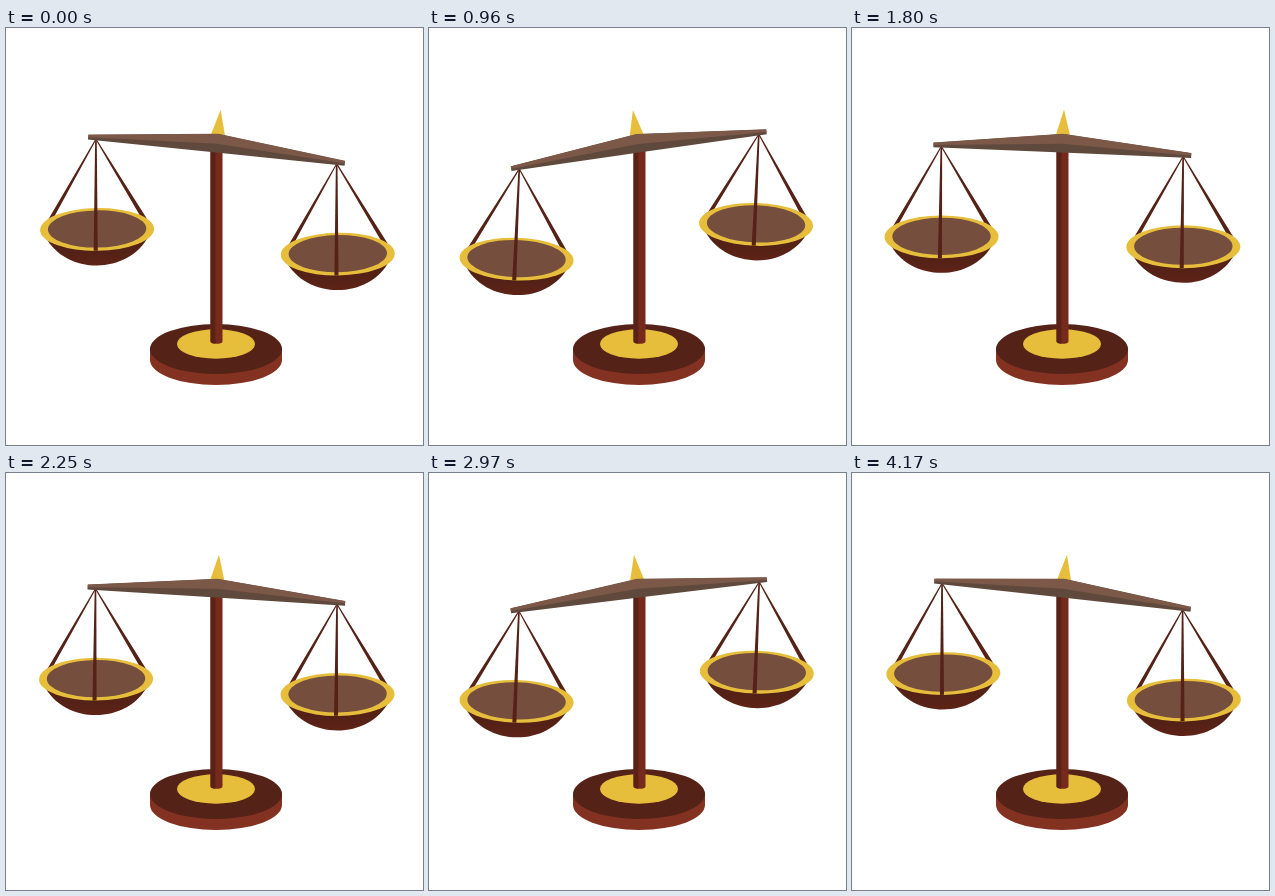
Recreate the animation shown at these times as an HTML page. Size 417 by 417 pixels, loop 4.2 s.

```html
<!DOCTYPE html>
<html lang="en">
<head>
<meta charset="utf-8">
<title>Balance scale</title>
<style>
  html, body { margin: 0; width: 100%; height: 100%; overflow: hidden; background: #fff; }
  svg { display: block; width: 100vw; height: 100vh; }
</style>
</head>
<body>
<svg viewBox="0 0 417 417">
  <defs>
    <linearGradient id="bowl" x1="0" y1="0" x2="0" y2="1">
      <stop offset=".5" stop-color="#532116"/>
      <stop offset="1" stop-color="#5e2317"/>
    </linearGradient>
    <!-- Pan with its strings; the hanging point is the origin -->
    <g id="pan">
      <path fill="#552217" d="M-.8 0 L-49 80 H-44.5 L.4 0Z M-.4 0 L45 80 H50 L.8 0Z"/>
      <path fill="url(#bowl)" d="M-52 96 C-32 136 32 136 52 96Z"/>
      <ellipse cy="90" rx="57" ry="21.4" fill="#e7be3b"/>
      <ellipse cy="89.5" rx="49.2" ry="18.6" fill="#764e3e"/>
      <path fill="#552217" d="M-.8 0 L-3.7 111.3 H.4 L.8 0Z"/>
    </g>
  </defs>

  <path fill="#833221" d="M144 321 V332 A66 25 0 0 0 276 332 V321Z"/>
  <ellipse cx="210" cy="321" rx="66" ry="25" fill="#552217"/>
  <ellipse cx="210" cy="316" rx="39" ry="14.7" fill="#e7be3b"/>
  <path fill="#762a1c" d="M204.5 118 H216.5 V313.5 A6 2.3 0 0 1 204.5 313.5Z"/>
  <path fill="#5a2217" d="M204.5 118 H209.3 V315.6 Q205 315.3 204.5 313.5Z"/>

  <use href="#pan" class="pan"/>
  <use href="#pan" class="pan"/>

  <g id="beam">
    <path fill="#e7be3b" d="M210.2 81.5 L217.5 108 H202.9Z"/>
    <path fill="#5f493c" d="M81.2 120 L210.2 106 L339.2 120 V124.6 L210.2 124.5 L81.2 124.6Z"/>
    <path fill="#7b5848" d="M81.2 119.7 L210.2 105.7 L339.2 119.7 V122.4 L210.2 115.8 L81.2 122.4Z"/>
  </g>
</svg>
<script>
  const SWING = 1050, LEAD = 30;
  const PIVOT = { x: 210.2, y: 125 };
  const ARM = 121, DROP = -1.2;
  const beam = document.getElementById('beam');
  const pans = document.querySelectorAll('.pan');

  // Steady swing there and back: 0 = right side low, 1 = left side low
  function swing(ms) {
    const p = ((ms + LEAD) / SWING) % 2;
    return p < 1 ? p : 2 - p;
  }

  function draw(ms) {
    const u = swing(ms);
    const tilt = 6.3 - 15.4 * u;
    const sway = -0.8 + 2.7 * u;
    const a = tilt * Math.PI / 180, c = Math.cos(a), s = Math.sin(a);
    beam.setAttribute('transform', `rotate(${tilt} ${PIVOT.x} ${PIVOT.y})`);
    pans.forEach((pan, i) => {
      const arm = i ? ARM : -ARM;
      const x = PIVOT.x + arm * c - DROP * s;
      const y = PIVOT.y + arm * s + DROP * c;
      pan.setAttribute('transform', `translate(${x} ${y}) rotate(${sway})`);
    });
  }

  const start = performance.now();
  function tick() {
    draw((performance.now() - start) % 4200);
    requestAnimationFrame(tick);
  }
  tick();
</script>
</body>
</html>
```
